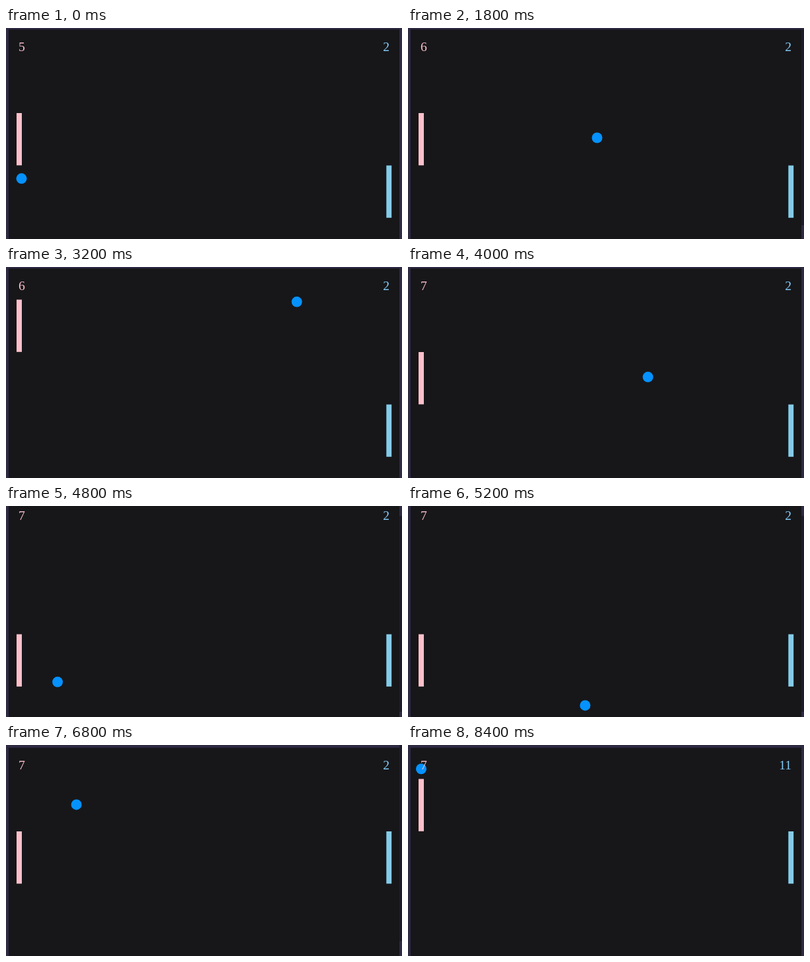
Write an HTML page with a canvas that moves like this. It is 600 by 320 pixels and loops after 9400 ms.

```html
<!DOCTYPE html>
<html lang="en">
<head>
<meta charset="utf-8">
<title>Paddle game</title>
<style>
  html, body { margin: 0; width: 100%; height: 100%; overflow: hidden; background: #17171a; }
  canvas { display: block; width: 600px; height: 320px; }
</style>
</head>
<body>
<canvas id="stage"></canvas>
<script>
const LOOP = 9400, SERVE = 1800, WIN = 11;
const TOP = 10, FLOOR = 327;               // limits for the ball's centre
const LEFT_FACE = 31, RIGHT_FACE = 568;    // contact with a paddle
const LEFT_WALL = 15, RIGHT_WALL = 592;    // contact behind a paddle
const TRAP = 20;                           // back of the left paddle
const SPEED_X = 0.4757, SPEED_Y = 0.1425;  // px per ms
const PADDLE_H = 79.3, STEP = 79.5, FIRST_ROW = 49.5;

const canvas = document.getElementById('stage');
const ctx = canvas.getContext('2d');
const dpr = window.devicePixelRatio || 1;
canvas.width = 600 * dpr;
canvas.height = 320 * dpr;

// A paddle starts on a row and moves one row per key press.
const left = { row: 1, up: [2100, 6500, 7000], down: [4000, 4300] };
const right = { row: 2, up: [6600], down: [] };

function paddleY(paddle, t) {
  const pressed = keys => keys.filter(at => at <= t).length;
  return FIRST_ROW + STEP * (paddle.row + pressed(paddle.down) - pressed(paddle.up));
}

function covers(paddle, y, t) {
  const top = paddleY(paddle, t);
  return y > top - 8 && y < top + PADDLE_H + 8;
}

// Plays the match from the serve, one state per millisecond.
function playMatch() {
  const states = [];
  let x = 286.5, y = 166.5, vx = -SPEED_X, vy = -SPEED_Y;
  let pink = 6, blue = 2, trapped = false, missed = false;
  for (let t = SERVE; t < LOOP; t++) {
    states.push({ x, y, pink, blue });
    if (blue >= WIN && x === TRAP) continue;
    x += vx;
    y += vy;
    if (y < TOP || y > FLOOR) vy = -vy;

    const paddle = vx < 0 ? left : right;
    const atFace = vx < 0 ? x < LEFT_FACE : x > RIGHT_FACE;
    if (atFace && !missed && !trapped) {
      if (covers(paddle, y, t)) vx = -vx;
      else missed = true;
    }
    if (x > RIGHT_WALL) {
      pink++;
      vx = -SPEED_X;
      missed = false;
    } else if (x < LEFT_WALL) {
      x = LEFT_WALL;
      blue++;
      vx = SPEED_X;
      trapped = true;
    } else if (trapped && x > TRAP) {
      x = TRAP;
      vx = -SPEED_X;
    }
  }
  return states;
}

const opening = { x: 23.5, y: 228.3, pink: 5, blue: 2 };
const match = playMatch();
const stateAt = t => t < SERVE ? opening : match[t - SERVE];

// The picture is refreshed every 100 ms, with a few stalls.
function sampled(t) {
  for (const [from, to] of [[0, SERVE], [5200, 5500], [7100, 7400]])
    if (t >= from && t < to) return from;
  return Math.floor(t / 100) * 100;
}

function smooth(t, from, to) {
  const k = Math.min(1, Math.max(0, (t - from) / (to - from)));
  return k * k * (3 - 2 * k);
}

const pageShift = t => -14 * smooth(t, 4200, 4600) + 16 * smooth(t, 5730, 6035);

const thumbAlpha = t => smooth(t, 1700, 1800) - smooth(t, 2800, 3200)
  + smooth(t, 4100, 4200) - smooth(t, 6900, 7100);

function rect(color, x, y, w, h) {
  ctx.fillStyle = color;
  ctx.fillRect(x, y, w, h);
}

function score(value, x, y, align, color) {
  ctx.fillStyle = color;
  ctx.textAlign = align;
  ctx.fillText(value, x, y);
}

function draw(t) {
  const shift = pageShift(t);
  const { x, y, pink, blue } = stateAt(t);
  ctx.setTransform(dpr, 0, 0, dpr, 0, 0);
  rect('#2d2a42', 0, 0, 600, 320);
  rect('#17171a', 4, 2.3 + shift, 592, 340);

  rect('#ffc0cb', 16, paddleY(left, t) + shift, 8, PADDLE_H);
  rect('#85cce8', 576.3, paddleY(right, t) + shift, 7.9, PADDLE_H);

  ctx.fillStyle = '#0592ff';
  ctx.beginPath();
  ctx.arc(x, y + shift, 8, 0, 2 * Math.PI);
  ctx.fill();

  ctx.font = '19.6px "Liberation Serif", "Times New Roman", serif';
  score(pink, 18.9, 35 + shift, 'left', '#ffc0cb');
  score(blue, 581, 35 + shift, 'right', '#87cefa');

  ctx.globalAlpha = thumbAlpha(t);
  rect('#1d1b29', 596.3, 2 - shift * 0.93, 3.7, 297);
  ctx.globalAlpha = 1;
}

const start = performance.now();
function tick() {
  draw(sampled((performance.now() - start) % LOOP));
  requestAnimationFrame(tick);
}
tick();
</script>
</body>
</html>
```
